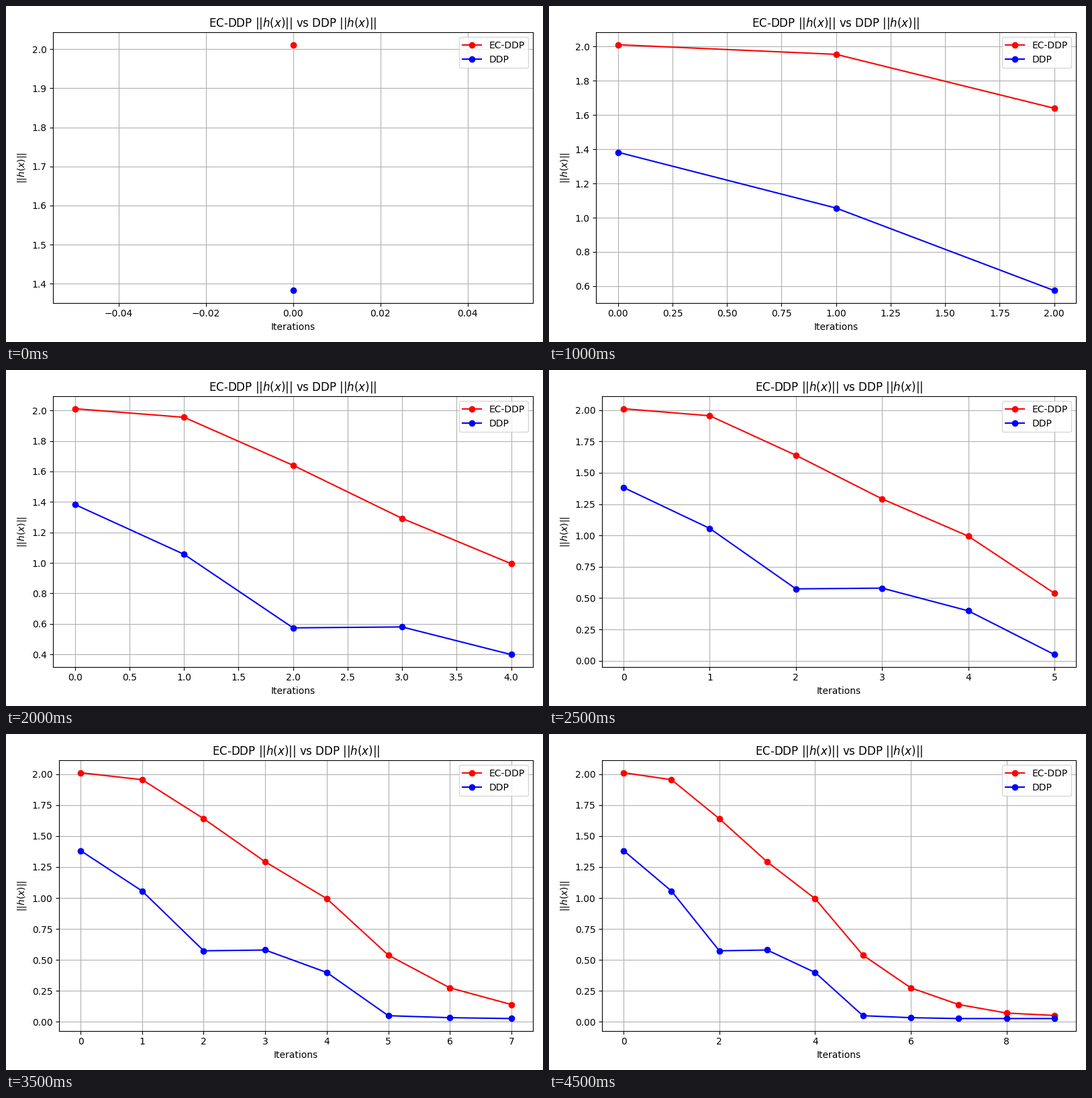
A matplotlib script for the animation above (5 s loop, 800x500 px).

```python
import matplotlib.pyplot as plt
from matplotlib.animation import FuncAnimation

STEPS = 10
NORM = r"||$h(x)$||"


def residuals(head, rate, floor):
    """Extend the opening values by geometric decay down to a floor."""
    values = list(head)
    while len(values) < STEPS:
        values.append(max(values[-1] * rate, floor))
    return values


CURVES = {
    "EC-DDP": ("red", residuals([2.0112, 1.955, 1.64, 1.292, 0.995, 0.539], 0.51, 0.052)),
    "DDP": ("blue", residuals([1.3825, 1.0563, 0.574, 0.58, 0.399, 0.05], 0.68, 0.027)),
}

plt.rcParams["font.family"] = "DejaVu Sans"
fig, ax = plt.subplots(figsize=(8, 5), dpi=100)


def update(frame):
    """Redraw both curves up to the given iteration."""
    ax.clear()
    for label, (color, values) in CURVES.items():
        ax.plot(values[:frame + 1], color=color, marker="o", label=label)
    ax.set_xlabel("Iterations")
    ax.set_ylabel(NORM)
    ax.set_title(f"EC-DDP {NORM} vs DDP {NORM}")
    ax.grid(True)
    ax.legend(loc="best")
    fig.tight_layout()
    return ax.lines


ani = FuncAnimation(fig, update, frames=STEPS, interval=500, repeat=True)
plt.show()
```
